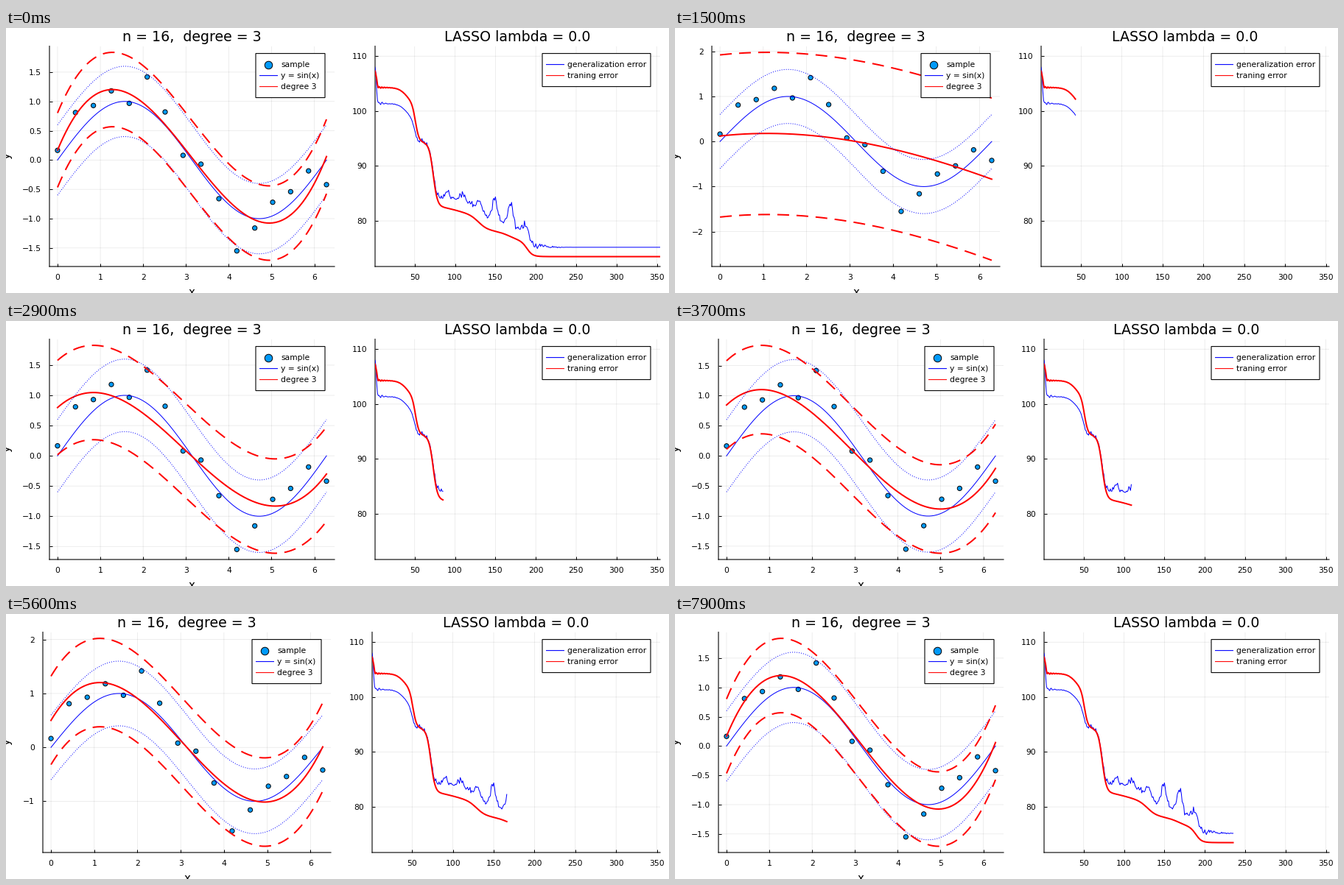
Animation, 900 px wide and 360 px high, one loop 8 s. Source, as a matplotlib script:

```python
import numpy as np
import matplotlib.pyplot as plt
from matplotlib.animation import FuncAnimation
from matplotlib.patches import Rectangle
from matplotlib.ticker import FuncFormatter
from matplotlib.transforms import Affine2D, ScaledTranslation, offset_copy

W, H, DPI = 900, 360, 72          # at 72 dpi one point is one pixel
FRAMES, INTERVAL, STEPS = 80, 100, 354
TOP, BOTTOM = 24.6, 324
SMALL, LABEL, TITLE = 10.8, 15, 19
BLUE, RED, DOT = "#0000ff", "#ff0000", "#009afa"
DASH, DOTS = (0, (8, 5)), (0, (1, 2))

plt.rcParams.update({"font.family": "DejaVu Sans", "font.size": SMALL,
                     "path.snap": False})
rng = np.random.default_rng(5)
step = np.arange(1, STEPS + 1)


def rise(center, width):
    """Smooth step from 0 to 1 over the training steps."""
    return (1 + np.tanh((step - center) / (2 * width))) / 2


# Training error: a plateau that falls in a few smooth drops
train = 104.3 + 3.1 * np.exp(-((step - 1) / 2.2) ** 2)
train += .35 * np.cos(2 * step) * np.exp(-step / 8)
for center, width, height in [(40, 5, 3), (51, 2.2, 7), (73, 2.6, 11.6),
                              (100, 10, 1.4), (129, 6, 3.1), (168, 8, 2),
                              (189, 3.5, 2.7)]:
    train -= height * rise(center, width)

# Generalization error: overtakes it, then ripples until it settles
active = rise(86, 1.5) - rise(203, 4)
ripple = (.5 + .5 * np.cos(2 * np.pi * (step - 90) / 19.7)) ** 2
ripple *= 1 + 3.3 * np.exp(-((step - 160) / 25) ** 2)
grain = .3 * (rise(53, 3) - rise(212, 8)) + .25 * np.exp(-step / 12)
gen = (train - 2.9 + 2.9 * rise(53, 2) + 2.2 * rise(78, 4) - .5 * rise(195, 5)
       + 3.8 * np.exp(-((step - 1) / 1.8) ** 4)
       + active * ripple + grain * rng.standard_normal(STEPS))

x = np.linspace(0, 2 * np.pi, 200)
sx = np.linspace(0, 2 * np.pi, 16)
sy = np.array([.165, .81, .93, 1.18, .967, 1.417, .82, .08, -.07, -.66,
               -1.55, -1.16, -.72, -.54, -.185, -.42])

# Fit state: cubic at x = 0, 2, 4, 2 pi, then half width of the band
knots = np.array([0, 2, 4, 2 * np.pi])
best = np.polyfit(sx, sy, 3)
spread = 2 * np.std(sy - np.polyval(best, sx))
states = {
    22: [.02, 0, -.215, -.795, 2.01],
    64: [.46, .613, -.018, -.97, 1.107],
    109: [.845, .715, -.597, -.208, .735],
    136: [.795, .817, -.637, -.104, .79],
    175: [.40, .94, -.69, .05, .83],
    196: [.243, .978, -.717, .111, .672],
    235: [*np.polyval(best, knots), spread],
}
# The fit moves fastest where the training error falls
clock = np.cumsum(np.r_[0, np.maximum(-np.diff(train), 0) + .03])
state_clock = [clock[n - 1] for n in states]
columns = list(zip(*states.values()))


def fit_at(n):
    now = [np.interp(clock[n - 1], state_clock, col) for col in columns]
    return np.polyval(np.polyfit(knots, now[:4], 3), x), now[4]


fig = plt.figure(figsize=(W / DPI, H / DPI), dpi=DPI, facecolor="white")


def make_axes(title):
    ax = fig.add_axes([.1, .1, .3, .8])
    ax.spines[["top", "right"]].set_visible(False)
    ax.spines[["left", "bottom"]].set_linewidth(1.1)
    for spine in ax.spines.values():
        spine.set_snap(False)
    ax.set_axisbelow(True)
    ax.grid(color="black", alpha=.1, lw=.7, snap=False)
    ax.tick_params(direction="in", length=4, width=1, labelsize=SMALL)
    ax.tick_params(axis="x", pad=9.5)
    ax.tick_params(axis="y", pad=11)
    above = offset_copy(ax.transAxes, fig, 0, 6.4, units="points")
    ax.text(.5, 1, title, transform=above, size=TITLE, ha="center")
    return ax


def place(ax, left, right):
    ax.set_position([left / W, 1 - BOTTOM / H,
                     (right - left) / W, (BOTTOM - TOP) / H])


def legend(ax, width, rows):
    """Rows of (text, colour, is_line)."""
    corner = Affine2D().scale(1, -1) + ScaledTranslation(1, 1, ax.transAxes)
    left = -13 - width
    ax.add_patch(Rectangle((left, 10), width, 15 * len(rows) + 15,
                           fc="white", ec="black", lw=1.1, transform=corner,
                           zorder=10, clip_on=False, snap=False))
    for i, (text, color, is_line) in enumerate(rows):
        y = 25 + 15 * i
        if is_line:
            ax.plot([left + 5, left + 30], [y, y], color=color, lw=1.1,
                    transform=corner, zorder=11, solid_capstyle="butt")
        else:
            ax.plot([left + 17.3], [y], "o", ms=10.5, mfc=color, mec="black",
                    mew=1, transform=corner, zorder=11)
        ax.text(left + 34, y + 3.7, text, transform=corner, size=SMALL,
                zorder=11)


# Left panel
fit_ax = make_axes("n = 16,  degree = 3")
fit_ax.set_xticks(range(7))
below = offset_copy(fit_ax.transAxes, fig, 0, -40, units="points")
fit_ax.text(.5, 0, "x", transform=below, size=LABEL, ha="center")
fig.text(5 / W, 1 - 174 / H, "y", size=LABEL, rotation=90,
         rotation_mode="anchor", ha="center", va="baseline")
legend(fit_ax, 94, [("sample", DOT, False), ("y = sin(x)", BLUE, True),
                    ("degree 3", RED, True)])
# One colour per dot keeps their positions unrounded
fit_ax.scatter(sx, sy, s=6.2 ** 2, c=[DOT] * len(sx), edgecolors="black",
               linewidths=1, zorder=3)
fit_ax.plot(x, np.sin(x), color=BLUE, lw=1, zorder=4)
fit_line, = fit_ax.plot(x, x, color=RED, lw=2, zorder=5)
for shift in (-.6, .6):
    fit_ax.plot(x, np.sin(x) + shift, color=BLUE, lw=1, ls=DOTS, zorder=6)
bands = [fit_ax.plot(x, x, color=RED, lw=2, ls=DASH, zorder=7)[0]
         for _ in range(2)]
fit_ax.set_xlim(-.06 * np.pi, 2.06 * np.pi)

# Right panel
err_ax = make_axes("LASSO lambda = 0.0")
legend(err_ax, 147, [("generalization error", BLUE, True),
                     ("traning error", RED, True)])
gen_line, = err_ax.plot([], [], color=BLUE, lw=1, zorder=3)
train_line, = err_ax.plot([], [], color=RED, lw=2, zorder=4)
err_ax.set(xlim=(1, STEPS), ylim=(71.7, 111.83),
           xticks=range(50, 351, 50), yticks=range(80, 111, 10))


def update(k):
    n = 3 * k - 2 if k else STEPS
    y, width = fit_at(n)
    fit_line.set_ydata(y)
    for line, sign in zip(bands, (-1, 1)):
        line.set_ydata(y + sign * width)

    lo, hi = min(y.min() - width, -1.6), max(y.max() + width, 1.6)
    pad = .03 * (hi - lo)
    lo, hi = lo - pad, hi + pad
    whole = np.floor(hi) - np.ceil(lo) >= 3
    gap = 1 if whole else .5
    form = "{:.0f}" if whole else "{:.1f}"
    fit_ax.set_ylim(lo, hi)
    fit_ax.set_yticks(np.arange(np.ceil(lo / gap), np.floor(hi / gap) + 1) * gap)
    fit_ax.yaxis.set_major_formatter(FuncFormatter(
        lambda v, _: form.format(v + 0.0).replace("-", "\u2212")))

    # Wider tick labels push both panels to the right
    place(fit_ax, *((50, 441) if whole else (59, 446)))
    place(err_ax, 497 if whole else 501, 888)

    gen_line.set_data(step[:n], gen[:n])
    train_line.set_data(step[:n], train[:n])
    return [fit_line, *bands, gen_line, train_line]


anim = FuncAnimation(fig, update, frames=FRAMES, interval=INTERVAL,
                     repeat=True, repeat_delay=0, blit=False)
plt.show()
```
